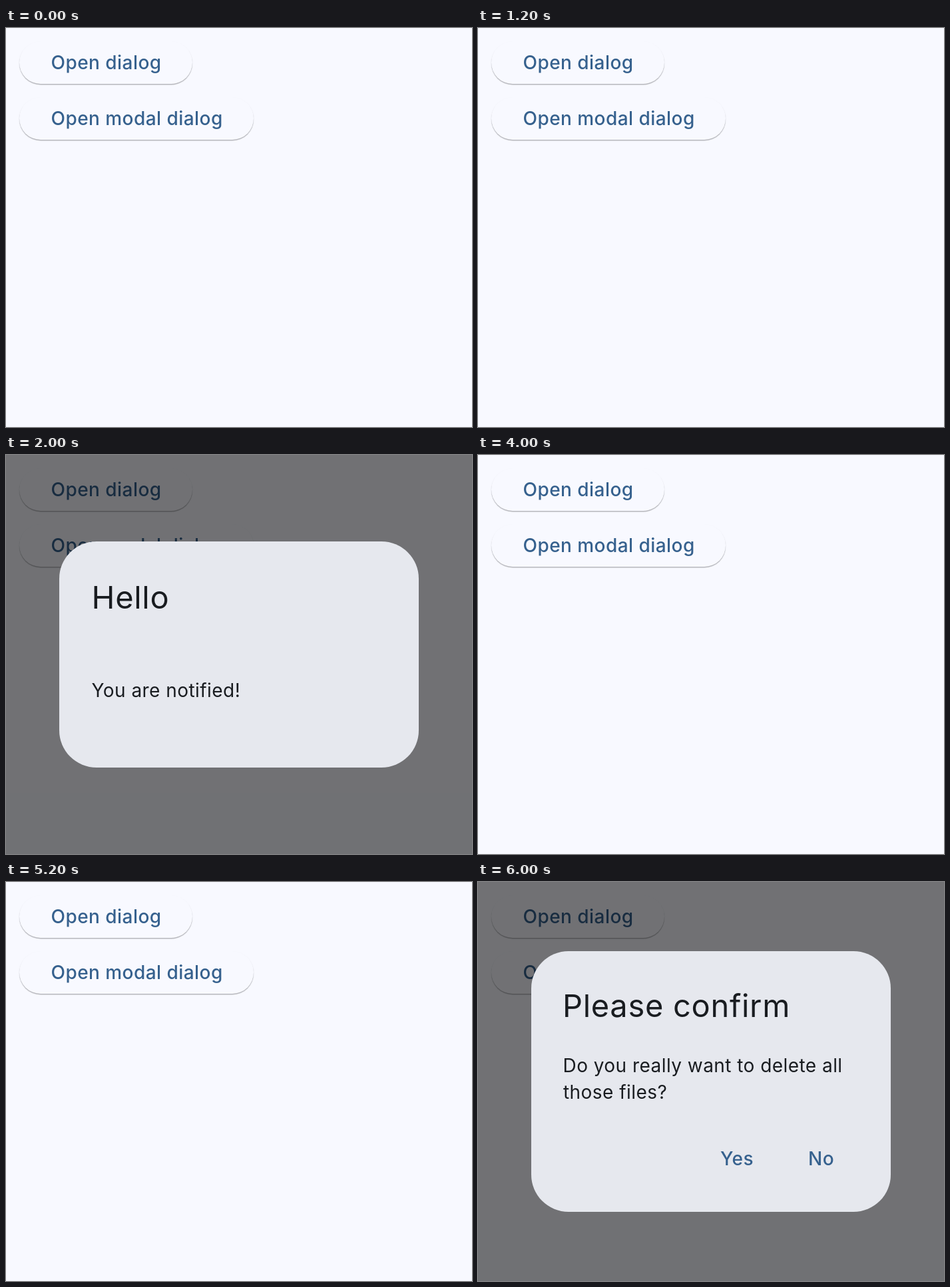
An HTML page that plays this animation: 700 px wide and 600 px high, repeating every 8 s.

```html
<!DOCTYPE html>
<html lang="en">
<head>
<meta charset="utf-8">
<title>Dialogs</title>
<style>
  html, body { margin: 0; width: 100%; height: 100%; overflow: hidden; background: #f8f9ff; }
  .stage { position: relative; width: 700px; height: 600px; overflow: hidden; background: #f8f9ff; }
  .button {
    position: absolute; left: 20px; height: 64px; border-radius: 32px; background: #f8f9ff;
    box-shadow: 0 1.5px 1px rgba(0, 0, 0, .24), 0 1px 2px rgba(0, 0, 0, .07);
  }
  svg { position: absolute; left: 0; top: 0; display: block; }
  text {
    font-family: Inter, Roboto, sans-serif; font-size: 28px; font-optical-sizing: none;
    letter-spacing: .45px; fill: #191c20; white-space: pre;
  }
  .label { font-weight: 500; fill: #36618e; }
  .title { font-size: 47px; letter-spacing: .7px; }
  .panel { fill: #e6e8ee; }
  .scrim { fill: #000; fill-opacity: .545; }
  .notice, .confirm { opacity: 0; animation: notice 8s step-end infinite; }
  .confirm { animation-name: confirm; }
  @keyframes notice { 0% { opacity: 0 } 25% { opacity: 1 } 50%, 100% { opacity: 0 } }
  @keyframes confirm { 0% { opacity: 0 } 75% { opacity: 1 } 100% { opacity: 1 } }
</style>
</head>
<body>
<div class="stage">
  <div class="button" style="top: 20px; width: 260px"></div>
  <div class="button" style="top: 104px; width: 352px"></div>
  <svg width="700" height="600" viewBox="0 0 700 600">
    <text class="label" x="67.5" y="62">Open dialog</text>
    <text class="label" x="67.5" y="146">Open modal dialog</text>

    <g class="notice">
      <rect class="scrim" width="700" height="600"/>
      <rect class="panel" x="80" y="130" width="540" height="340" rx="56"/>
      <text class="title" x="128.5" y="231">Hello</text>
      <text x="128.5" y="364">You are notified!</text>
    </g>

    <g class="confirm">
      <rect class="scrim" width="700" height="600"/>
      <rect class="panel" x="80" y="104" width="540" height="392" rx="56"/>
      <text class="title" x="127" y="203">Please confirm</text>
      <text x="127.5" y="286">Do you really want to delete all</text>
      <text x="128" y="326">those files?</text>
      <text class="label" x="364" y="426">Yes</text>
      <text class="label" x="496" y="426">No</text>
    </g>
  </svg>
</div>
</body>
</html>
```
